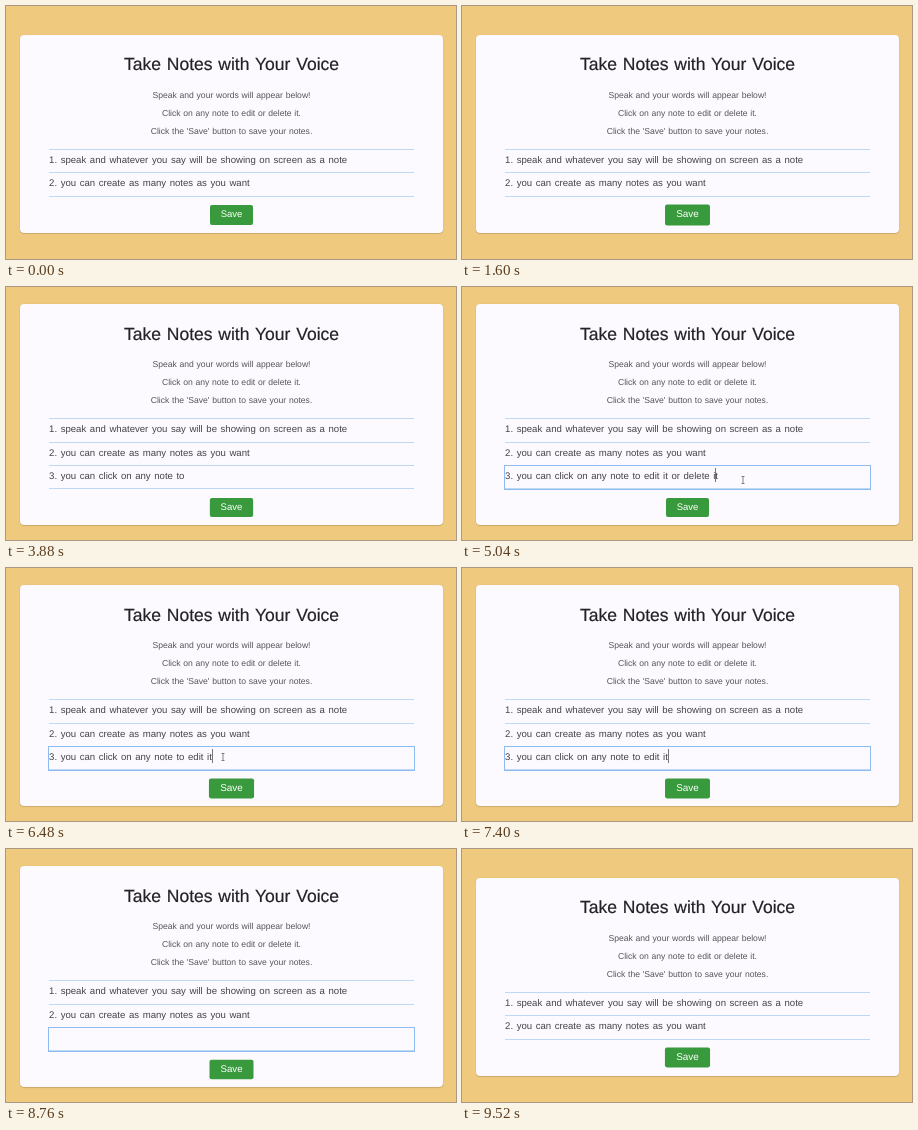
These frames come from a looping animation (450 by 253 pixels, 9560 ms). An HTML page:

```html
<!DOCTYPE html>
<html lang="en">
<head>
<meta charset="utf-8">
<title>Voice notes</title>
<style>
  * { box-sizing: border-box; margin: 0; }
  html, body { width: 100%; height: 100%; overflow: hidden; background: #efca7e; }
  body {
    position: relative;
    font: 8.6px/18.2px "Liberation Sans", Arial, sans-serif;
    word-spacing: .3px;
    color: #55545a;
    text-rendering: geometricPrecision;
  }
  #card {
    position: absolute; left: 14px; top: 17px; width: 423px; padding: 16.7px 28.7px 8px;
    border-radius: 4px; background: #fcfafe; text-align: center;
    box-shadow: 0 .5px 1px #70542c80;
  }
  #card.short { top: 28.7px; }
  h1 {
    height: 34.2px; font-size: 17.5px; line-height: 26px; font-weight: 400;
    word-spacing: 1px; color: #222126; -webkit-text-stroke: .2px #222126;
  }
  #notes { margin-top: 9px; border-top: 1px solid #bfd9f4; text-align: left; }
  .note {
    height: 23.3px; padding-left: .4px; border-bottom: 1px solid #bfd9f4;
    font-size: 9.6px; line-height: 22.4px; word-spacing: .9px; color: #444349; white-space: pre;
  }
  .note.focused { outline: 1px solid #8fbcf0; outline-offset: -.5px; }
  .short #third { display: none; }
  mark { padding: 2.5px 0; background: #338fff; color: #fff; }
  #caret {
    display: inline-block; width: 1px; height: 14px; margin-right: -1px;
    vertical-align: -3px; background: #777;
  }
  #save {
    width: 43px; height: 19.2px; margin: 8.7px auto 0; border-radius: 2px;
    background: #389a3c; color: #fff; font-size: 9.5px; line-height: 19px;
  }
  #mouse { position: absolute; left: 0; top: 0; overflow: visible; }
</style>
</head>
<body>
<div id="card">
  <h1>Take Notes with Your Voice</h1>
  <p>Speak and your words will appear below!</p>
  <p>Click on any note to edit or delete it.</p>
  <p>Click the 'Save' button to save your notes.</p>
  <div id="notes">
    <div class="note">1. speak and whatever you say will be showing on screen as a note</div>
    <div class="note">2. you can create as many notes as you want</div>
    <div class="note" id="third"><span id="before"></span><mark id="selected"></mark><i id="caret"></i><span id="after"></span></div>
  </div>
  <div id="save">Save</div>
</div>
<svg id="mouse" width="1" height="1"><path d="M-1.5-3.5h3M0-3.5v7M-1.5 3.5h3" fill="none" stroke="#666" stroke-width=".8"/></svg>
<script>
const LOOP = 9560;
const PHRASE = 'you can click on any note to edit it or delete it';
const WORDS = PHRASE.split(' ');
const KEPT = 'you can click on any note to edit it'.length;
const el = id => document.getElementById(id);
const [card, third, before, selected, caret, after, save, mouse] =
  ['card', 'third', 'before', 'selected', 'caret', 'after', 'save', 'mouse'].map(el);

// Pointer stops: time, x, y
const PATH = [
  [4400, 330, 225], [4800, 281, 193], [5150, 281, 193], [5300, 262, 190],
  [5750, 209, 189], [6300, 217, 189], [6850, 217, 189], [7300, 225, 260]
];

const progress = (t, start, end) => Math.min(1, Math.max(0, (t - start) / (end - start)));
const mix = (a, b, p) => a + (b - a) * p;
const within = (t, start, end) => t >= start && t < end;

// Text of the third note with its selection and caret position
function noteState(t) {
  if (t < 4300) {
    const spoken = Math.floor(progress(t, 3250, 4200) * WORDS.length);
    return { text: WORDS.slice(0, spoken).join(' '), from: 0, to: 0, at: 0 };
  }
  if (t < 6000) {
    const end = PHRASE.length;
    const from = Math.round(mix(end, KEPT, progress(t, 5300, 5750)));
    return { text: PHRASE, from, to: end, at: end - 1 };
  }
  if (t < 8500) {
    const from = Math.round(mix(KEPT, 0, progress(t, 7800, 8100)));
    return { text: PHRASE.slice(0, KEPT), from, to: KEPT, at: KEPT };
  }
  return { text: '', from: 0, to: 0, at: 0 };
}

function drawNote(t) {
  const { text, from, to, at } = noteState(t);
  const focused = within(t, 4560, 9000);
  const selecting = to > from;
  const split = selecting ? from : at;
  before.textContent = text ? '3. ' + text.slice(0, split) : '';
  selected.textContent = selecting ? text.slice(from, to) : '';
  after.textContent = text.slice(selecting ? to : split);
  third.classList.toggle('focused', focused);
  caret.style.display = focused && !selecting && t % 1000 < 520 ? '' : 'none';
}

function drawMouse(t) {
  const next = PATH.findIndex(stop => stop[0] > t);
  mouse.style.display = next > 0 ? '' : 'none';
  if (next < 1) return;
  const [t0, x0, y0] = PATH[next - 1], [t1, x1, y1] = PATH[next];
  const p = progress(t, t0, t1);
  mouse.style.transform = `translate(${mix(x0, x1, p)}px, ${mix(y0, y1, p)}px)`;
}

function draw() {
  const t = performance.now() % LOOP;
  card.classList.toggle('short', !within(t, 2960, 9000));
  drawNote(t);
  drawMouse(t);
  const pulse = (1 - Math.cos(t / 1000 * 2 * Math.PI)) / 2;
  save.style.transform = `scale(${1 + .05 * pulse})`;
  requestAnimationFrame(draw);
}
draw();
</script>
</body>
</html>
```
